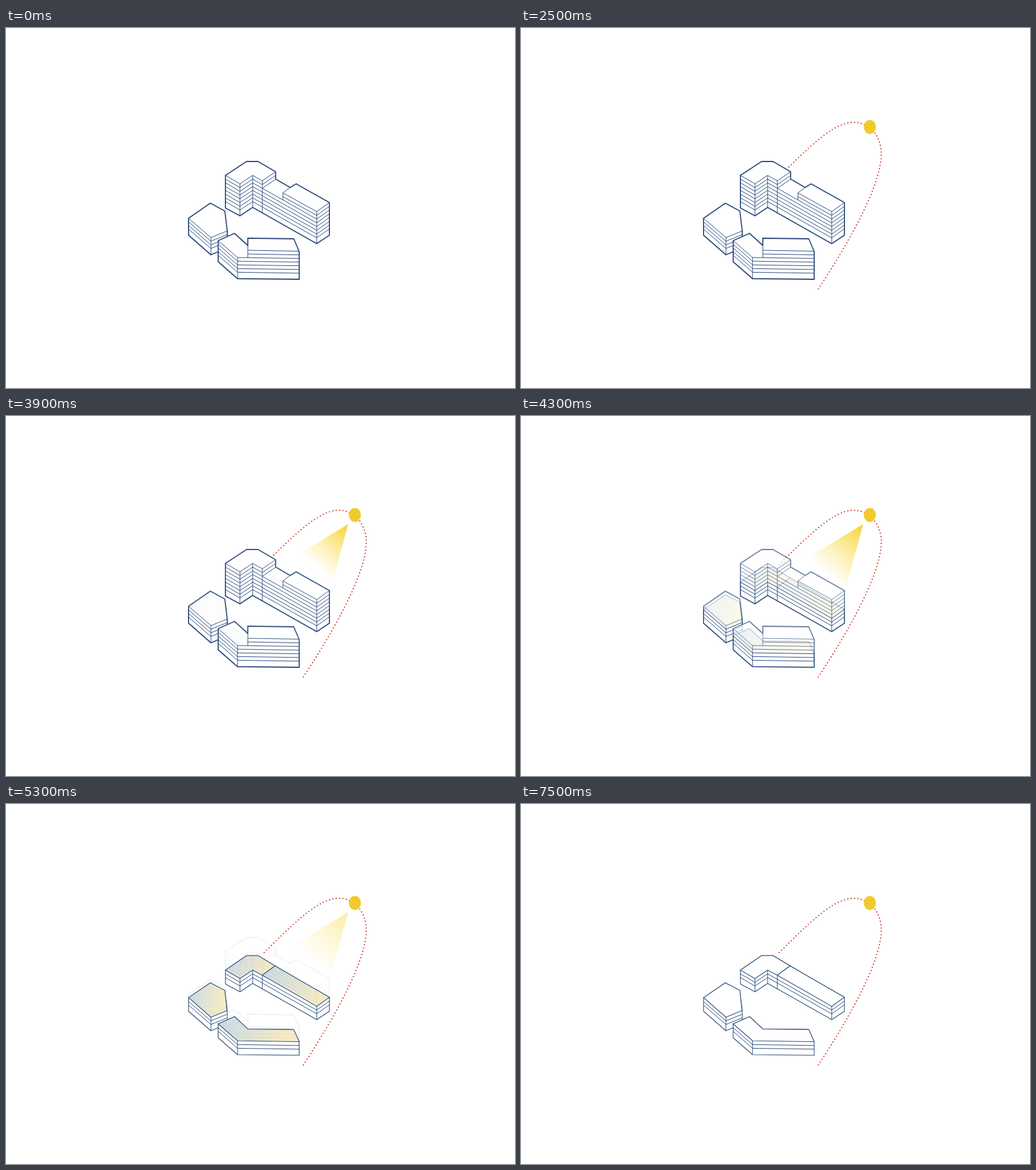
An HTML page that plays this animation: 842x596 px, repeating every 8000 ms.

```html
<!DOCTYPE html>
<html lang="en">
<head>
<meta charset="utf-8">
<title>Sunlight massing study</title>
<style>
  html, body { margin: 0; width: 100%; height: 100%; overflow: hidden; background: #fff; }
  svg { display: block; width: 100%; height: 100%; }
  .shape, .lines { stroke: #2b4b7c; stroke-linejoin: round; }
  .shape { fill: #fff; }
  .lines { fill: none; stroke-width: 1; }
  #tall .shape { stroke-width: 1.8; }
  #low .shape { stroke-width: 1.1; }
</style>
</head>
<body>
<svg viewBox="0 0 842 596">
  <defs>
    <linearGradient id="roofTint" x1="0" y1="0.4" x2="1" y2="0.6">
      <stop offset="0.1" stop-color="#cddbdf"/>
      <stop offset="0.9" stop-color="#f7ebc1"/>
    </linearGradient>
    <linearGradient id="beamTint" gradientUnits="userSpaceOnUse" x1="566" y1="179" x2="499" y2="259">
      <stop offset="0" stop-color="#f6d32a"/>
      <stop offset="1" stop-color="#fbe267" stop-opacity="0"/>
    </linearGradient>
  </defs>
  <path id="orbit" fill="none" d="M492 432C531 372 596 266 596 208C596 180 577 156 550 156C515 156 468 206 427 246"/>
  <g id="dots" fill="#d3372b"></g>
  <polygon id="beam" points="566,179 472,236 536,290" fill="url(#beamTint)"/>
  <ellipse id="sun" rx="10" ry="11.6" fill="#f0cb2b"/>
  <g id="low"></g>
  <g id="tall"></g>
</svg>
<script>
const LOOP = 8000, STEP = 100, DOT_GAP = 5.6;
const $ = id => document.getElementById(id);
const clamp = v => Math.min(1, Math.max(0, v));
const ramp = (t, from, to) => clamp((t - from) / (to - from));

function add(parent, tag, attrs) {
  const el = document.createElementNS('http://www.w3.org/2000/svg', tag);
  for (const key in attrs) el.setAttribute(key, attrs[key]);
  return parent.appendChild(el);
}

// Points are written as "x,y x,y"; the result is an open path moved down by dy.
const trace = (pts, dy = 0) => 'M' + pts.split(' ').map(p => {
  const [x, y] = p.split(',').map(Number);
  return x + ' ' + (y + dy);
}).join('L');

// Repeats a top edge on each floor from first to last.
function floors(pts, height, first, last) {
  let d = '';
  for (let k = first; k <= last; k++) d += trace(pts, k * height);
  return d;
}

const shape = (group, pts) => add(group, 'path', { class: 'shape', d: trace(pts) + 'Z' });
const lines = (group, d) => add(group, 'path', { class: 'lines', d });
const roofs = [];
const roof = (group, pts) => roofs.push(shape(group, pts));

const tall = $('tall'), low = $('low');
const tower = '363,244 387,258 408,244 424,253';
const wing = '424,253 514,304 535,289';
const block = '458,273 514,304 535,289';
const pentagon = '302,315 339,347 366,336';
const front = '351,352 383,380 485,381.5';

// Tall version
shape(tall, '363,244 398,221 417,221 446,238 446,250 470,264 480,258 535,289 535,343 514,357 408,297 387,311 363,298');
lines(tall, floors(tower, 6.2, 0, 7) + floors('424,253 446,238', 6.2, 0, 2) +
  floors(wing, 6.2, 2, 7) + floors(block, 6.2, 0, 1) +
  'M387 258V311M408 244V297M424 253V307M514 304V357M458 284.5V273L470 264');
shape(tall, '302,315 338,290 362,303 366,336 366,364 339,375.5 302,343');
lines(tall, floors(pentagon, 6, 0, 3) + 'M339 347V375');
shape(tall, '351,352 378,340 400,360 400,348 476,349 485,370 485,416 383,415 351,387');
lines(tall, floors(front, 6.1, 0, 4) + floors('400,368 485,369.5', 6.1, 0, 1) + 'M383 380V415M400 360V380');

// Low version
shape(low, '363,275 398,251 417,251 446,268.5 535,320 535,343 514,357 408,297 387,311 363,298');
roof(low, '363,275 398,251 417,251 445,268 424,283.5 408,275 387,289');
roof(low, '424,283.5 445,268 535,320 514,335');
lines(low, floors(tower, 6.2, 6, 7) + floors(wing, 6.2, 6, 7) +
  'M387 289V311M408 275V297M424 284V307M514 335V357');
shape(low, '302,321 338,296 362,309 366,342 366,364 339,375.5 302,343');
roof(low, '302,320.5 338,296 362,308.5 365.5,342 339,353');
lines(low, floors(pentagon, 6, 2, 3) + 'M339 353V375');
shape(low, '351,364 378,352 400,372.4 476,373.4 485,393.5 485,416 383,415 351,387');
roof(low, '351,364 378,352 400,372.4 476,373.4 485,393.5 383,392');
lines(low, floors(front, 6.1, 3, 4) + 'M383 392V415');

// Sun path
const orbit = $('orbit'), length = orbit.getTotalLength();
const dots = [];
for (let d = 0; d <= length; d += DOT_GAP) {
  const p = orbit.getPointAtLength(d);
  dots.push(add($('dots'), 'circle', { cx: p.x, cy: p.y, r: 1.1 }));
}
let sunEnd = length;
while (orbit.getPointAtLength(sunEnd).x < 577) sunEnd -= 0.25;

const show = (el, on) => el.setAttribute('visibility', on ? 'visible' : 'hidden');

function draw(time) {
  const t = Math.floor(time / STEP) * STEP;

  const drawn = ramp(t, 200, 1400) * length;
  dots.forEach((dot, i) => show(dot, t > 200 && i * DOT_GAP <= drawn));

  const spot = orbit.getPointAtLength(3 + (sunEnd - 3) * ramp(t, 1500, 2500));
  $('sun').setAttribute('transform', `translate(${spot.x} ${spot.y - 1.8})`);
  show($('sun'), t >= 1500);

  const grow = ramp(t, 3000, 4050);
  $('beam').setAttribute('transform', `translate(566 179) scale(${grow}) translate(-566 -179)`);
  $('beam').setAttribute('opacity', 1 - ramp(t, 4400, 6000));
  show($('beam'), grow > 0 && t < 6000);

  tall.setAttribute('opacity', 1 - ramp(t, 3800, 5400));
  show(low, t > 3800);
  const fill = t < 7500 ? 'url(#roofTint)' : '#fff';
  roofs.forEach(r => { r.style.fill = fill; });
}

const start = performance.now();
function tick() {
  draw((performance.now() - start) % LOOP);
  requestAnimationFrame(tick);
}
tick();
</script>
</body>
</html>
```
